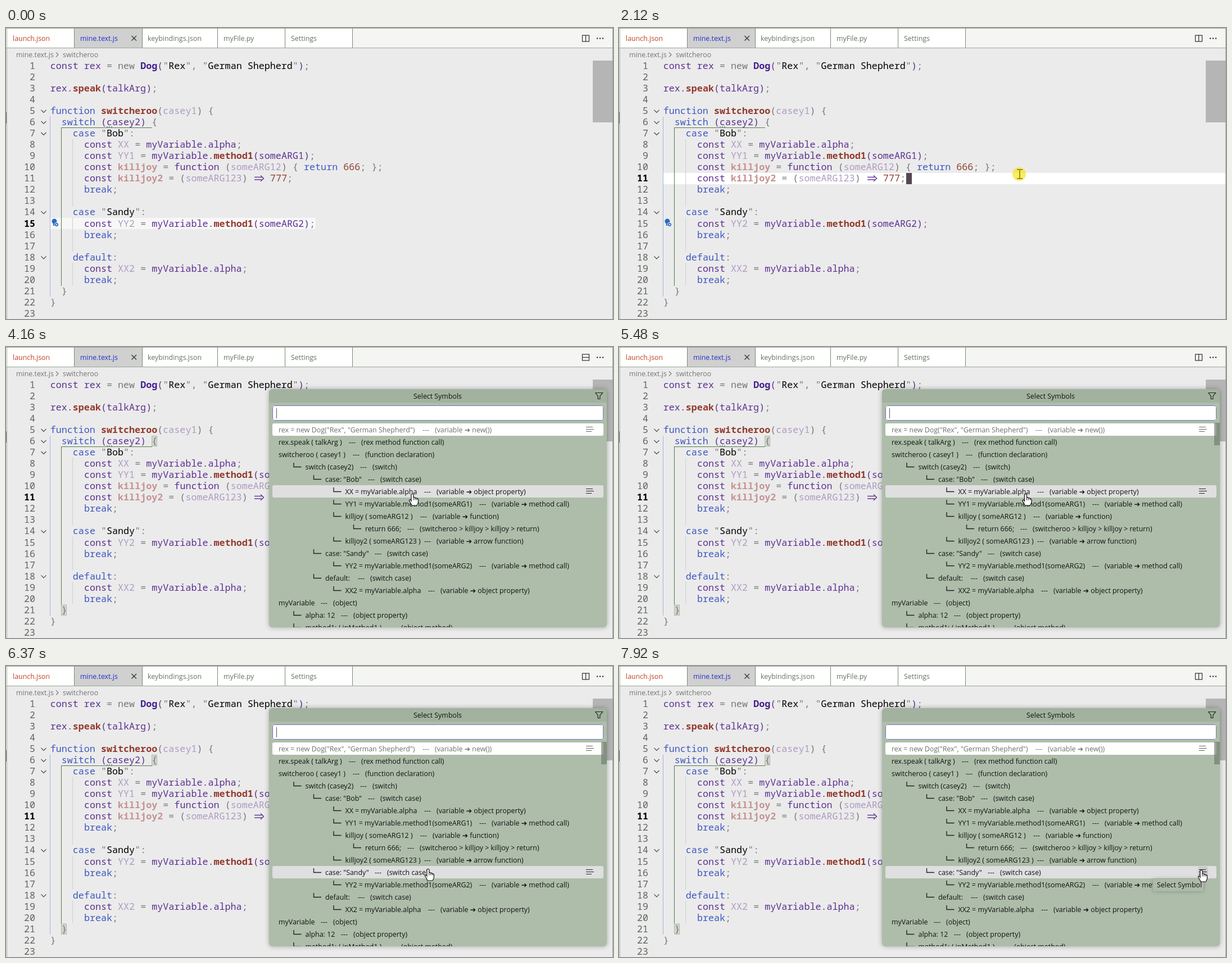
Recreate the animation shown at these times as an HTML page with a canvas. Size 1080 by 518 pixels, loop 8 s.

```html
<!DOCTYPE html>
<html lang="en">
<head>
<meta charset="utf-8">
<title>Symbol picker</title>
<style>
html, body { margin: 0; width: 100%; height: 100%; overflow: hidden; background: #ebebeb; }
canvas { display: block; width: 1080px; height: 518px; }
</style>
</head>
<body>
<canvas id="stage" width="1080" height="518"></canvas>
<script>
const c = document.getElementById('stage').getContext('2d');
const LOOP = 8000;
const UI = '12.4px "Open Sans", "Noto Sans", "DejaVu Sans", sans-serif';
const MONO = '16.72px "Noto Sans Mono", "DejaVu Sans Mono", monospace';
const CODE_X = 78.7, COL = 10.03, ROW = 20.03;

// "~x" switches the token style; capitals are bold
const INK = {
  p: '#5c3092', g: '#777777', k: '#000000', b: '#3f58c2', v: '#ae9ac2', n: '#91402f',
  D: '#43208f', M: '#933a2e', K: '#c69291'
};
const CODE = [
  '~pconst rex ~g= new ~DDog~p(~g"~kRex~g", "~kGerman Shepherd~g"~p)~g;',
  '',
  '~prex.~Mspeak~p(talkArg)~g;',
  '',
  '~bfunction ~Mswitcheroo~g(~vcasey1~g) {',
  '  ~bswitch ~p(casey2) ~g{',
  '    ~bcase ~g"~kBob~g":',
  '      ~pconst ~vXX ~g= ~pmyVariable.alpha~g;',
  '      ~pconst ~vYY1 ~g= ~pmyVariable.~Mmethod1~p(someARG1)~g;',
  '      ~pconst ~Kkilljoy ~g= ~pfunction ~g(~vsomeARG12~g) { ~breturn ~n666~g; };',
  '      ~pconst ~Kkilljoy2 ~g= (~vsomeARG123~g)    ~n777~g;',
  '      ~bbreak~g;',
  '',
  '    ~bcase ~g"~kSandy~g":',
  '      ~pconst ~vYY2 ~g= ~pmyVariable.~Mmethod1~p(someARG2)~g;',
  '      ~bbreak~g;',
  '',
  '    ~bdefault~g:',
  '      ~pconst ~vXX2 ~g= ~pmyVariable.alpha~g;',
  '      ~bbreak~g;',
  '  ~g}',
  '~g}',
  ''
];

// depth, label, x of the kind, kind
const SYMBOLS = [
  [0, 'rex = new Dog("Rex", "German Shepherd")', 763, 'variable ➔ new()'],
  [0, 'rex.speak ( talkArg )', 632, 'rex method function call'],
  [0, 'switcheroo ( casey1 )', 639, 'function declaration'],
  [1, 'switch (casey2)', 652, 'switch'],
  [2, 'case: "Bob"', 666, 'switch case'],
  [3, 'XX = myVariable.alpha', 766, 'variable ➔ object property'],
  [3, 'YY1 = myVariable.method1(someARG1)', 864, 'variable ➔ method call'],
  [3, 'killjoy ( someARG12 )', 759, 'variable ➔ function'],
  [4, 'return 666;', 736, 'switcheroo > killjoy > killjoy > return'],
  [3, 'killjoy2 ( someARG123 )', 766, 'variable ➔ arrow function'],
  [2, 'case: "Sandy"', 678, 'switch case'],
  [3, 'YY2 = myVariable.method1(someARG2)', 864, 'variable ➔ method call'],
  [2, 'default:', 648, 'switch case'],
  [3, 'XX2 = myVariable.alpha', 773, 'variable ➔ object property'],
  [0, 'myVariable', 582, 'object'],
  [1, 'alpha: 12', 618, 'object property'],
  [1, 'method1: ( inMethod1 )', 703, 'object method']
];

// Pointer keys: time, x, y
const POINTER = [
  [830, 995, 494], [1200, 862, 392], [1570, 739, 299], [1850, 713, 260], [2200, 713, 260],
  [2500, 724, 262], [4159, 724, 262], [4160, 723, 261], [5480, 723, 261], [5820, 871, 320],
  [6050, 886, 375], [6230, 882, 364], [6370, 751, 361], [6640, 728, 363], [6840, 728, 363],
  [7200, 900, 374], [7580, 1027, 370], [7710, 1034, 364], [7920, 1036, 363]
];
const EDITOR_BLINK = [2120, 2590, 3140, 3600, 4070];
const INPUT_BLINK = [4160, 4690, 5220, 5740, 6230, 6640, 7240, 7710];
const POPUP_AT = 4160;
const HAND = new Path2D('M-2 1.5Q0-1 2 1.5V7Q4 5.5 5 8Q7 6.5 8 9Q10.5 8.5 10.5 11V15Q10 18 8 21H-1' +
  'Q-2 18-4.5 14.5Q-6 12-5 11Q-3.5 10-2 13Z');

function pointerAt(t) {
  const next = POINTER.findIndex(k => k[0] > t);
  if (next < 0) return POINTER[POINTER.length - 1].slice(1);
  if (next === 0) return POINTER[0].slice(1);
  const a = POINTER[next - 1], b = POINTER[next];
  const u = (t - a[0]) / (b[0] - a[0]);
  return [a[1] + (b[1] - a[1]) * u, a[2] + (b[2] - a[2]) * u];
}

const blinkOn = (times, t) => times.filter(x => x <= t).length % 2 === 1;
const lineY = n => 67.3 + ROW * (n - 1);

function rect(x, y, w, h, color) {
  c.fillStyle = color;
  c.fillRect(x, y, w, h);
}

function round(x, y, w, h, r, color) {
  c.beginPath();
  c.roundRect(x, y, w, h, r);
  c.fillStyle = color;
  c.fill();
}

function line(color, width, ...pts) {
  c.beginPath();
  for (let i = 0; i < pts.length; i += 2) c.lineTo(pts[i], pts[i + 1]);
  c.strokeStyle = color;
  c.lineWidth = width;
  c.stroke();
}

function dot(x, y, r, color) {
  c.beginPath();
  c.arc(x, y, r, 0, Math.PI * 2);
  c.fillStyle = color;
  c.fill();
}

function text(str, x, y, color, font = UI) {
  c.font = font;
  c.fillStyle = color;
  c.fillText(str, x, y);
}

function drawTabs(splitDown) {
  rect(0, 0, 617, 35, '#ffffff');
  rect(617, 0, 463, 35, '#f5f5f4');
  rect(122, 1, 120, 34, '#d0d0d0');
  rect(0, 0, 1080, 1, '#94a18f');
  rect(0, 35, 1080, 1, '#98a695');
  for (const x of [121, 242, 376, 496, 616]) rect(x, 1, 1, 34, '#798a75');
  text('launch.json', 12, 23, '#bd4420');
  text('mine.text.js', 132, 23, '#2430cc');
  for (const [name, x] of [['keybindings.json', 252], ['myFile.py', 387], ['Settings', 507]])
    text(name, x, 23, '#66735f');
  line('#333', 1.2, 223.5, 14, 232, 22.5);
  line('#333', 1.2, 232, 14, 223.5, 22.5);

  c.strokeStyle = '#303030';
  c.lineWidth = 1.2;
  c.strokeRect(1025.5, 13, 12, 11);
  if (splitDown) line('#303030', 1.2, 1025, 18.5, 1038, 18.5);
  else line('#303030', 1.2, 1031.5, 13, 1031.5, 24);
  for (const x of [1052, 1057, 1062]) dot(x, 18.5, 1.2, '#303030');

  text('mine.text.js', 18, 52, '#747474');
  line('#777', 1.1, 89, 43.5, 93, 47.5, 89, 51.5);
  text('switcheroo', 101, 52, '#747474');
}

function drawGuides() {
  rect(78, 158, 1, 320, '#a4b4e2');
  for (const [from, to] of [[8, 13], [15, 17], [19, 20]])
    rect(118, lineY(from) - 10, 1, (to - from + 1) * ROW, '#cfcfcf');
  rect(98, 177, 1, 282, '#527b48');
  rect(98, 177, 162, 1, '#527b48');
  for (const x of [179, 183, 187]) rect(x, 175, 1.7, 1.7, '#777');
}

function drawBracketBox(x, n) {
  rect(x, lineY(n) - 9.5, 10, 19, '#d0d6cc');
  c.strokeStyle = '#b4bbb0';
  c.lineWidth = 1;
  c.strokeRect(x + .5, Math.round(lineY(n)) - 8.5, 9, 18);
}

function drawCodeLine(src, n) {
  let style = 'g', col = 0;
  for (const part of src.split(/(~\w)/)) {
    if (part[0] === '~') { style = part[1]; continue; }
    const weight = style < 'a' ? 'bold ' : '500 ';
    text(part, CODE_X + col * COL, lineY(n) + 5.8, INK[style], weight + MONO);
    col += part.length;
  }
}

function drawBulb() {
  dot(86, 344, 4.5, '#2d6bc4');
  rect(84, 347, 4, 5, '#2d6bc4');
  dot(90, 350, 3.9, '#ebebeb');
  dot(90, 350, 3, '#2d6bc4');
  dot(90, 350, 1.3, '#ebebeb');
}

function drawEditor(t) {
  const active = t < 2100 ? 15 : 11;
  rect(0, 0, 1080, 518, '#ebebeb');
  if (active === 15) rect(79, 338, 472, 20, '#f7f7f7');
  else if (t < POPUP_AT) rect(79, 258, 1000, 20, '#ffffff');
  drawTabs(t >= 3940 && t < 4360);
  drawGuides();
  if (t >= 2400) {
    drawBracketBox(259, 6);
    drawBracketBox(98, 21);
  }
  CODE.forEach((src, i) => {
    const n = i + 1;
    c.textAlign = 'right';
    text(n, 52, lineY(n) + 5.8, n === active ? '#000' : '#5b665a', (n === active ? '600 ' : '') + MONO);
    c.textAlign = 'left';
    drawCodeLine(src, n);
  });
  line(INK.p, 1.4, 442, 265.5, 455, 265.5);
  line(INK.p, 1.4, 442, 270, 455, 270);
  line(INK.p, 1.4, 453, 262.5, 458.5, 267.7, 453, 273);
  for (const n of [5, 6, 7, 14, 18]) {
    const y = lineY(n);
    line('#444', 1.2, 62.5, y - 1.5, 67, y + 3, 71.5, y - 1.5);
  }
  if (t < 2400) drawBulb();
  if (t < POPUP_AT && blinkOn(EDITOR_BLINK, t)) rect(511, 258, 10, 20, '#55474f');
  rect(1044, 58, 35, 110, '#b5b5b5');
  rect(1, 0, 1, 518, '#a4aea1');
  rect(0, 150, 1, 20, '#777');
  rect(1079, 0, 1, 518, '#98a695');
}

function drawRowIcon(y, color) {
  line(color, 1.2, 1032, y - 4.5, 1044, y - 4.5);
  line(color, 1.2, 1032, y - .5, 1046, y - .5);
  line(color, 1.2, 1032, y + 3.5, 1042, y + 3.5);
}

function drawSymbol([depth, label, kindX, kind], i, hover) {
  const y = 147 + 22 * i;
  const color = i ? '#111111' : '#6d706c';
  const x = depth ? 497 + 35.5 * depth : 485;
  if (i === 0 || i === hover) {
    round(474, y - 11, 589, 22, 3, i ? '#dfdfdf' : '#ffffff');
    drawRowIcon(y, i ? '#222' : '#666');
  }
  if (depth) line('#222', 1.4, x - 20.5, y - 7, x - 20.5, y + .5, x - 7, y + .5);
  text(label, x, y + 4.5, color);
  text('---', kindX - 22, y + 4.5, color);
  text('(' + kind + ')', kindX, y + 4.5, color);
}

function drawPopup(t) {
  c.save();
  c.shadowColor = 'rgba(0,0,0,.3)';
  c.shadowBlur = 9;
  round(468, 75, 601, 424, 6, '#adbda9');
  c.restore();
  c.save();
  c.beginPath();
  c.roundRect(468, 75, 601, 424, 6);
  c.clip();
  rect(468, 75, 601, 24, '#a2b29e');
  c.textAlign = 'center';
  text('Select Symbols', 768, 92, '#111');
  c.textAlign = 'left';
  line('#222', 1.2, 1048.5, 81.5, 1061.5, 81.5, 1056.8, 87.5, 1056.8, 92.5, 1053.2, 92.5, 1053.2, 87.5, 1048.5, 81.5);

  round(474, 104, 589, 27, 3, '#ffffff');
  c.beginPath();
  c.roundRect(474.5, 104.5, 588, 26, 3);
  c.strokeStyle = '#7a74bd';
  c.lineWidth = 1;
  c.stroke();
  if (blinkOn(INPUT_BLINK, t)) rect(481, 109, 1, 18, '#555');

  const hover = Math.round((pointerAt(Math.max(POPUP_AT, t - 70))[1] - 147) / 22);
  SYMBOLS.forEach((s, i) => drawSymbol(s, i, hover));
  if (t >= 4220) rect(1059, 135, 10, 40, 'rgba(110,122,107,.65)');
  c.restore();

  if (t >= 7710) round(1030, 357, 18, 20, 4, 'rgba(0,0,0,.09)');
  if (t >= 7850) {
    c.save();
    c.shadowColor = 'rgba(0,0,0,.25)';
    c.shadowBlur = 6;
    round(950, 379, 90, 22, 3, '#adbaa8');
    c.restore();
    text('Select Symbol', 957, 394, '#111');
  }
}

function drawPointer(t) {
  if (t < 830) return;
  const [x, y] = pointerAt(t);
  c.save();
  c.translate(x, y);
  if (t < POPUP_AT) {
    for (const [color, w] of [['#ffffff', 4], ['#222222', 2]]) {
      line(color, w, 0, -8, 0, 8);
      line(color, w, -5, -8, 5, -8);
      line(color, w, -5, 8, 5, 8);
    }
  } else {
    c.fillStyle = '#fff';
    c.fill(HAND);
    c.strokeStyle = '#111';
    c.lineWidth = 1.2;
    c.stroke(HAND);
    for (const fx of [2, 5, 8]) line('#111', 1, fx, 8, fx, 11.5);
  }
  // Click glow lies over the pointer
  if (t >= 2050 && t < 2400) {
    c.globalAlpha = .6 * Math.min(1, (2400 - t) / 200);
    dot(-1, 0, 12, '#f5e000');
  }
  c.restore();
}

function frame() {
  const t = performance.now() % LOOP;
  drawEditor(t);
  if (t >= POPUP_AT) drawPopup(t);
  drawPointer(t);
  requestAnimationFrame(frame);
}
frame();
</script>
</body>
</html>
```
